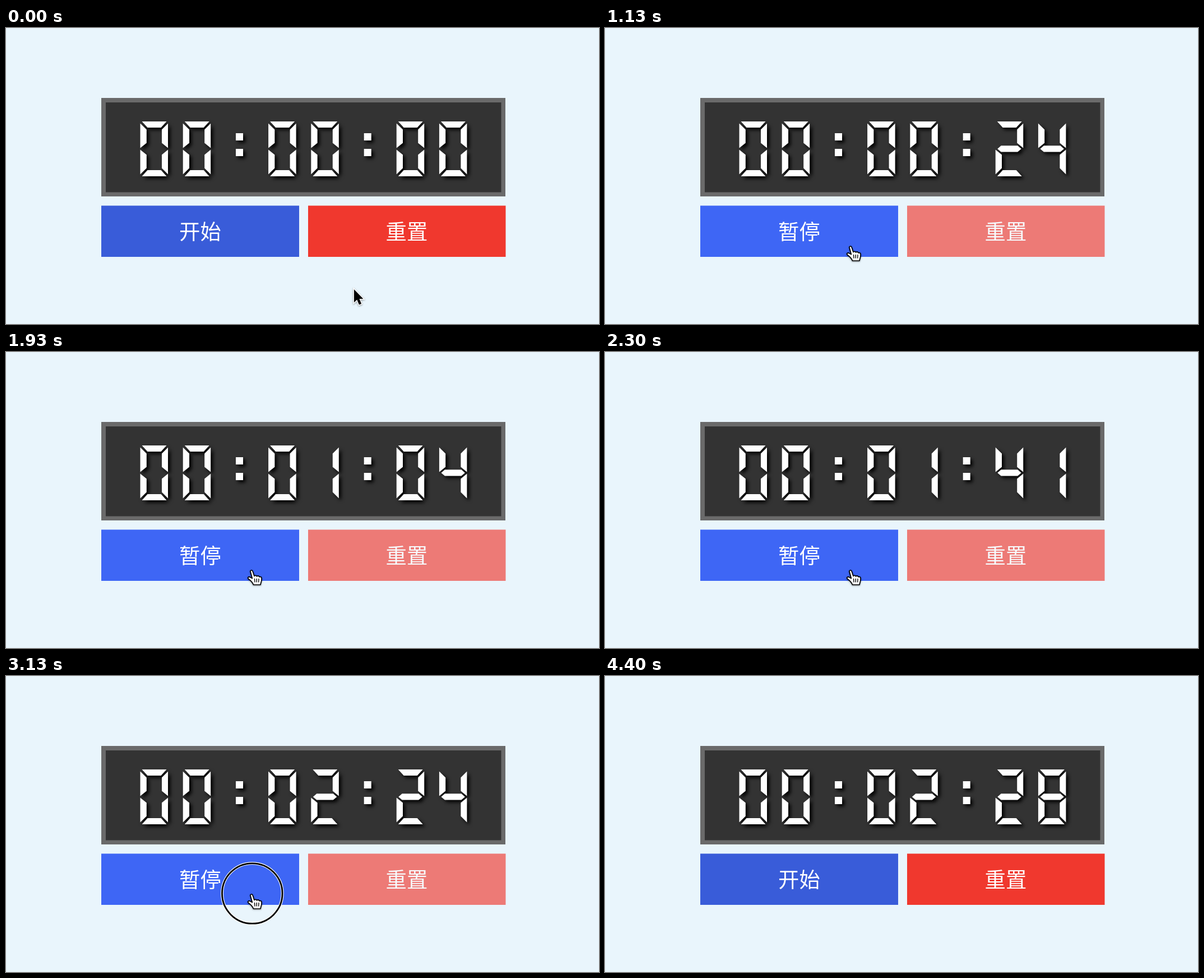
An HTML page for the animation above (4430 ms loop, 1058x529 px).

```html
<!DOCTYPE html>
<html lang="zh-CN">
<head>
<meta charset="utf-8">
<title>秒表</title>
<style>
  html, body { margin: 0; width: 100%; height: 100%; overflow: hidden; background: #e9f5fc; }
  svg { display: block; width: 100vw; height: 100vh; }
  text {
    font: 500 37.4px "Noto Sans CJK SC", "Noto Sans CJK", sans-serif;
    fill: #fff;
    text-anchor: middle;
  }
  #digits, .colon { fill: #fff; }
  .glow { filter: drop-shadow(4px 4px 3px #000); }

  .start, .reset, .ring, .cursor, .arrow, .hand {
    animation: 4430ms linear infinite;
  }
  .start { fill: #395cd9; animation-name: hover; }
  .reset { animation-name: disable; }
  .ring { animation-name: press; animation-timing-function: step-end; fill: none; }
  .cursor { animation-name: travel; filter: drop-shadow(0 1.5px 1.5px rgba(0, 0, 0, .4)); }
  .arrow { animation-name: over-page; animation-timing-function: step-end; }
  .hand { animation-name: over-button; animation-timing-function: step-end; }

  @keyframes hover {
    0%, 12.9% { fill: #395cd9; }
    15.3%, 89.1% { fill: #3e66f5; }
    91.5%, 100% { fill: #395cd9; }
  }
  @keyframes disable {
    0%, 20% { opacity: 1; }
    23.3%, 71.7% { opacity: .65; }
    75.1%, 100% { opacity: 1; }
  }
  @keyframes press {
    0% { opacity: 0; }
    16.7% { opacity: 1; }
    20% { opacity: 0; }
    69.1% { opacity: 1; }
    71.7%, 100% { opacity: 0; }
  }
  @keyframes over-page {
    0% { opacity: 1; }
    12.9% { opacity: 0; }
    89.1%, 100% { opacity: 1; }
  }
  @keyframes over-button {
    0% { opacity: 0; }
    12.9% { opacity: 1; }
    89.1%, 100% { opacity: 0; }
  }
  @keyframes travel {
    0% { transform: translate(621px, 467px); }
    3.4% { transform: translate(606px, 471px); }
    6.8% { transform: translate(560px, 474px); }
    9.5% { transform: translate(505px, 462px); }
    12% { transform: translate(462px, 421px); }
    14% { transform: translate(443px, 396px); }
    15.6%, 85.1% { transform: translate(439px, 390px); }
    89.4% { transform: translate(448px, 312px); }
    93.2% { transform: translate(475px, 120px); }
    96.2%, 100% { transform: translate(505px, -40px); }
  }
</style>
</head>
<body>
<svg viewBox="0 0 1058 529">
  <rect x="170" y="125" width="721" height="176" fill="#6a6a6a"/>
  <rect x="178" y="133" width="705.5" height="160.5" fill="#333"/>
  <g class="glow">
    <g id="digits"></g>
    <path class="colon" d="M410 188h13v13h-13z m0 28h13v13h-13z M638.7 188h13v13h-13z m0 28h13v13h-13z"/>
  </g>

  <rect class="start" x="170" y="317.5" width="353" height="91.5"/>
  <text id="label" x="346.5" y="378">开始</text>
  <g class="reset">
    <rect x="539" y="317.5" width="352.5" height="91.5" fill="#f0382e"/>
    <text x="715" y="378">重置</text>
  </g>

  <g class="ring">
    <circle cx="439.3" cy="388.6" r="53.8" stroke="#fff" stroke-width="5"/>
    <circle cx="439.3" cy="388.6" r="53.8" stroke="#000" stroke-width="2.8"/>
  </g>

  <g class="cursor">
    <path class="arrow" d="M0 0V23.5L5.3 18.6L9 27.5L13.2 25.7L9.5 17H16.5Z"
      stroke="#fff" stroke-width="3" paint-order="stroke"/>
    <g class="hand" stroke="#000" stroke-width="1.7" stroke-linecap="round" stroke-linejoin="round">
      <path fill="#fff" d="M-2.8 3C-4 0 0-1 1.2 2L4 10.5C5 8.8 8 9 8.5 11C10 9.5 12.5 10 13 12C15 11 17.2 12 17 15C17.4 20 15.5 22 15 26H2.5C1 22-3 18-6.5 15.5C-8.5 13-6 11-3.5 12.5L.3 14.5Z"/>
      <path d="M4.5 15.5L5 21M8.3 15.5V21M12 15.5L11.7 21" fill="none" stroke-width="1.4"/>
    </g>
  </g>
</svg>
<script>
  const LOOP = 4430, STEP = 100 / 3;
  const START = 884, STOP = 3178, LAST = 228;

  const SEGMENTS = {
    a: 'M3 0H47L37 11H13Z',
    b: 'M49.5 3.5V47.5L38.5 38.5V14.5Z',
    c: 'M49.5 94.5V50.5L38.5 59.5V83.5Z',
    d: 'M3 98H47L37 87H13Z',
    e: 'M0 94.5V50.5L11.3 59.5V83.5Z',
    f: 'M0 3.5V47.5L11.3 38.5V14.5Z',
    g: 'M3.5 49L10 43.3H39.5L46 49L39.5 54.5H10Z'
  };
  const SHAPES = ['abcdef', 'bc', 'abged', 'abgcd', 'fgbc', 'afgcd', 'afgedc', 'abc', 'abcdefg', 'abcdfg']
    .map(keys => [...keys].map(k => SEGMENTS[k]).join(''));

  const digits = [0, 1, 3, 4, 6, 7].map(cell => {
    const path = document.createElementNS('http://www.w3.org/2000/svg', 'path');
    path.setAttribute('transform', `translate(${239.5 + cell * 76.2} 167)`);
    document.getElementById('digits').append(path);
    return path;
  });
  const label = document.getElementById('label');

  const pad = n => String(n).padStart(2, '0');

  function draw(ms) {
    // The display refreshes thirty times a second.
    const t = Math.floor((ms + 3.4) / STEP) * STEP;
    const count = Math.max(0, Math.min(LAST, Math.floor((t - START) * 0.0998)));
    const seconds = Math.floor(count / 100);
    const time = pad(Math.floor(seconds / 60)) + pad(seconds % 60) + pad(count % 100);
    digits.forEach((path, i) => path.setAttribute('d', SHAPES[time[i]]));
    label.textContent = t >= START && t < STOP ? '暂停' : '开始';
  }

  let origin;
  function tick(now) {
    origin ??= now;
    draw((now - origin) % LOOP);
    requestAnimationFrame(tick);
  }
  draw(0);
  requestAnimationFrame(tick);
</script>
</body>
</html>
```
